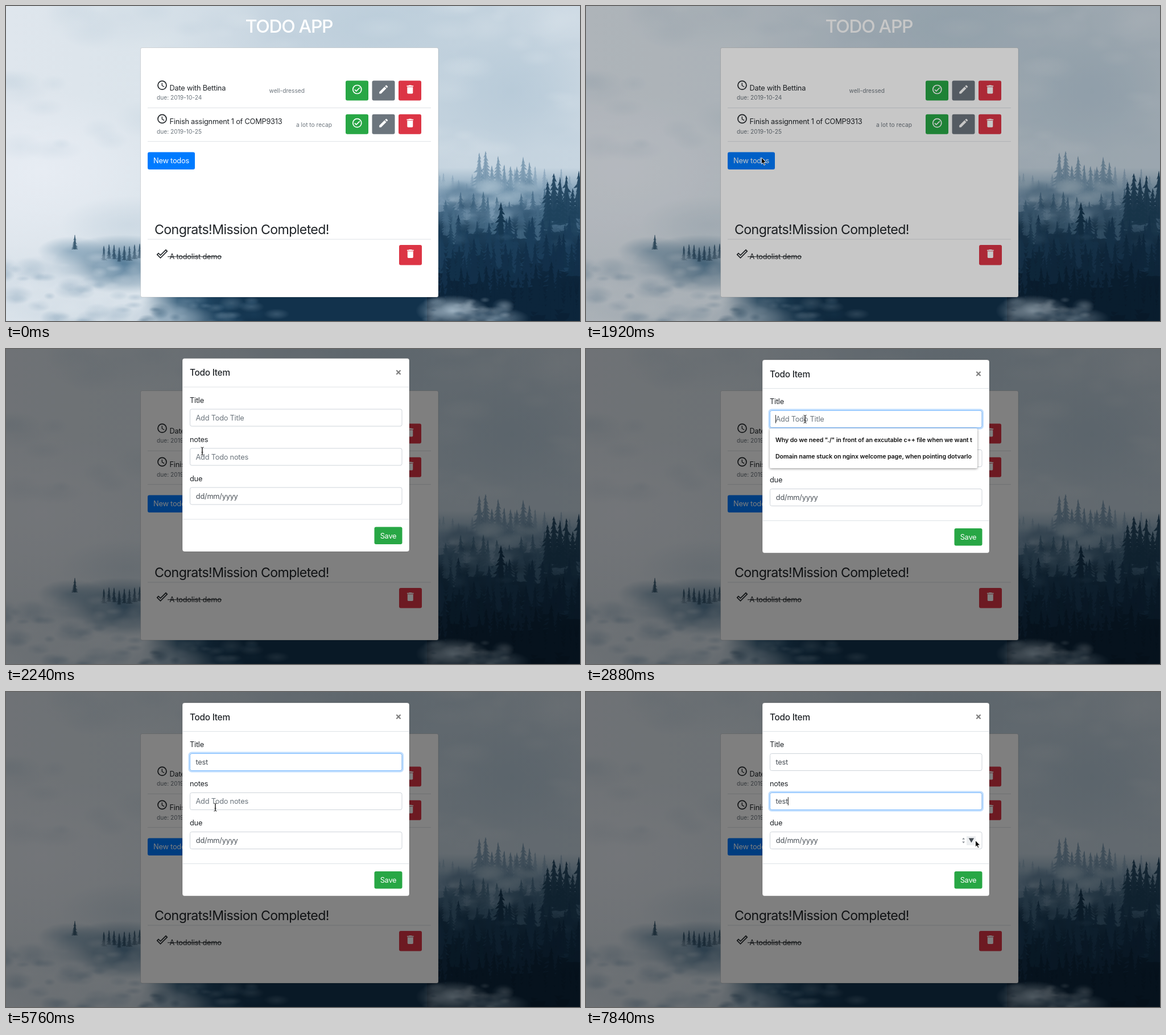
An HTML page with a canvas that plays this animation: 1009 by 555 pixels, repeating every 8 s.

```html
<!DOCTYPE html>
<html lang="en">
<head>
<meta charset="utf-8">
<title>Todo app</title>
<style>
  html, body { margin: 0; width: 100%; height: 100%; overflow: hidden; }
  canvas, svg { position: absolute; left: 0; top: 0; width: 1009px; height: 555px; }
  text { font: 12.8px Inter, "Open Sans", sans-serif; letter-spacing: -.018em; fill: #212529; white-space: pre; }
  .small { font-size: 10.2px; letter-spacing: 0; fill: #6c757d; }
  .white { fill: #fff; }
  .mid { text-anchor: middle; }
  .h1 { font-size: 31.9px; font-weight: 500; letter-spacing: -.04em; }
  .h3 { font-size: 23.2px; letter-spacing: -.027em; }
  .h5 { font-size: 15.4px; font-weight: 500; letter-spacing: -.018em; }
  .hint { fill: #6c757d; }
  .value { fill: #495057; }
  .pick { font-size: 10.66px; font-weight: 600; letter-spacing: -.009em; fill: #111; }
  .rule { stroke: #dee2e6; fill: none; }
  .field { fill: #fff; stroke: #ced4da; }
  #list { filter: drop-shadow(0 1px 2px rgba(0, 0, 0, .45)); }
</style>
</head>
<body>
<canvas id="photo" width="1009" height="555"></canvas>
<svg viewBox="0 0 1009 555">
  <defs>
    <symbol id="clock" viewBox="0 0 24 24">
      <g fill="none" stroke="#212529"><circle cx="12" cy="12" r="9" stroke-width="2"/><path d="M11.8 7v5.6l4.6 2.7" stroke-width="1.6"/></g>
    </symbol>
    <symbol id="ok" viewBox="0 0 24 24">
      <g fill="none" stroke="#fff" stroke-width="2"><circle cx="12" cy="12" r="9"/><path d="M6.7 12.3l3.4 3.3 7.2-7.2"/></g>
    </symbol>
    <symbol id="pen" viewBox="0 0 24 24">
      <path fill="#fff" d="M3 17.25V21h3.75L17.81 9.94l-3.75-3.75zM20.71 7.04a1 1 0 0 0 0-1.41l-2.34-2.34a1 1 0 0 0-1.41 0l-1.83 1.83 3.75 3.75z"/>
    </symbol>
    <symbol id="bin" viewBox="0 0 24 24">
      <path fill="#fff" d="M6 19c0 1.1.9 2 2 2h8c1.1 0 2-.9 2-2V7H6zM19 4h-3.5l-1-1h-5l-1 1H5v2h14z"/>
    </symbol>
    <symbol id="done" viewBox="0 0 24 24">
      <path fill="#212529" d="M19.77 5.03l1.4 1.4L8.43 19.17l-5.6-5.6 1.4-1.4 4.2 4.2zm0-2.83L8.43 13.54l-4.2-4.2L0 13.57 8.43 22 24 6.43z" fill-rule="evenodd"/>
    </symbol>
    <clipPath id="cut"><rect x="323" y="140" width="356" height="71"/></clipPath>
  </defs>

  <text class="h1 white mid" x="497.5" y="46.5">TODO APP</text>
  <rect x="236.5" y="73.5" width="523.5" height="439.5" rx="3" fill="#fff" stroke="rgba(0,0,0,.125)"/>

  <g id="acts">
    <use href="#clock" x="264.5" y="129.7" width="20" height="20"/>
    <rect x="597" y="131.5" width="40" height="35" rx="3" fill="#28a745"/>
    <rect x="643.5" y="131.5" width="40" height="35" rx="3" fill="#6c757d"/>
    <rect x="690" y="131.5" width="40" height="35" rx="3" fill="#dc3545"/>
    <use href="#ok" x="607.3" y="137" width="20" height="20"/>
    <use href="#pen" x="653.7" y="137" width="20" height="20"/>
    <use href="#bin" x="700.3" y="137" width="20" height="20"/>
    <path class="rule" d="M249 179.5H747"/>
  </g>
  <use href="#acts" y="59.2"/>
  <text x="287.5" y="149">Date with Bettina</text>
  <text class="small" x="265" y="165.3">due: 2019-10-24</text>
  <text class="small" x="462.5" y="153.3">well-dressed</text>
  <text x="287.5" y="208.4">Finish assignment 1 of COMP9313</text>
  <text class="small" x="265" y="224.6">due: 2019-10-25</text>
  <text class="small" x="510" y="212.6">a lot to recap</text>

  <rect id="add" x="249" y="257.5" width="83" height="30.5" rx="3"/>
  <text class="white mid" x="290.5" y="277.4">New todos</text>

  <text class="h3" x="261" y="402">Congrats!Mission Completed!</text>
  <path class="rule" d="M249 411H747"/>
  <use href="#done" x="264.5" y="426.7" width="20" height="20"/>
  <text x="287.5" y="445.8">A todolist demo</text>
  <path d="M284 441.7H379" stroke="#212529"/>
  <rect x="691" y="421" width="40" height="35.5" rx="3" fill="#dc3545"/>
  <use href="#bin" x="700.8" y="426.5" width="20" height="20"/>

  <rect id="dim" width="1009" height="555"/>

  <g id="modal">
    <rect x="310" y="19" width="399" height="340.5" rx="4" fill="#fff" stroke="rgba(0,0,0,.2)"/>
    <path class="rule" d="M310 69.5H709M310 302.5H709"/>
    <text class="h5" x="323" y="49.7">Todo Item</text>
    <path d="M686.3 40l7.2 7.2m0-7.2l-7.2 7.2" stroke="#7f7f7f" stroke-width="2.2"/>
    <text x="323" y="97">Title</text>
    <text x="323" y="166">notes</text>
    <text x="323" y="235">due</text>
    <rect class="field" x="323.5" y="108.5" width="372.5" height="30" rx="3"/>
    <rect class="field" x="323.5" y="177.5" width="372.5" height="30" rx="3"/>
    <rect class="field" x="323.5" y="246.5" width="372.5" height="30" rx="3"/>
    <g id="focus" fill="none">
      <rect x="321.7" y="-1.8" width="376" height="33.6" rx="4.5" stroke="#007bff" stroke-opacity=".25" stroke-width="2.5"/>
      <rect x="323.5" width="372.5" height="30" rx="3" stroke="#80bdff"/>
    </g>
    <text id="title" x="333.5" y="128.4"></text>
    <text id="notes" x="333.5" y="197.4"></text>
    <text class="value" x="333.8" y="266.4">dd/mm/yyyy</text>
    <rect id="caret" width="1" height="14.5" fill="#222"/>
    <g id="spin">
      <rect x="669" y="254" width="16" height="16" fill="#eceef0"/>
      <path d="M672.7 257.5h9.4l-4.7 8z" fill="#444b52"/>
      <path d="M661.2 259.7l2.4-3 2.4 3zm0 3.8l2.4 3 2.4-3z" fill="#8a9096"/>
    </g>
    <rect x="647.5" y="316" width="49" height="30.5" rx="3" fill="#28a745"/>
    <text class="white mid" x="672" y="336">Save</text>
    <g id="list">
      <rect x="323" y="140" width="365" height="70" rx="2" fill="#fff"/>
      <g clip-path="url(#cut)">
        <text class="pick" x="333" y="164.3">Why do we need "./" in front of an excutable c++ file when we want to run</text>
        <text class="pick" x="333" y="193.3">Domain name stuck on nginx welcome page, when pointing dotvarlo</text>
      </g>
    </g>
  </g>

  <path id="arrow" d="M0 0v11.6l2.6-2.4 1.8 4.2 1.9-.8-1.8-4.1h3.7z" stroke="#fff" stroke-width=".9"/>
  <g id="beam" fill="none">
    <path d="M-2.5-7Q0-7 0-5V5Q0 7-2.5 7M2.5-7Q0-7 0-5V5Q0 7 2.5 7M-1.5 2h3" stroke="#fff" stroke-width="2" stroke-opacity=".6"/>
    <path d="M-2.5-7Q0-7 0-5V5Q0 7-2.5 7M2.5-7Q0-7 0-5V5Q0 7 2.5 7M-1.5 2h3" stroke="#222"/>
  </g>
</svg>

<script>
const $ = id => document.getElementById(id);

// Misty forest backdrop
const g = $('photo').getContext('2d');
let seed = 11;
const rnd = () => (seed = (seed * 16807) % 2147483647) / 2147483647;
const between = (a, b) => a + (b - a) * rnd();

function puff(x, y, rx, ry, color, alpha) {
  g.save();
  g.translate(x, y);
  g.scale(rx, ry);
  const r = g.createRadialGradient(0, 0, 0, 0, 0, 1);
  r.addColorStop(0, color + 'ff');
  r.addColorStop(.5, color + '90');
  r.addColorStop(1, color + '00');
  g.globalAlpha = alpha;
  g.fillStyle = r;
  g.fillRect(-1, -1, 2, 2);
  g.restore();
}

function wisps(count, x0, x1, y0, y1, size, colors, alpha) {
  for (let i = 0; i < count; i++) {
    const r = size * between(.4, 1.3);
    puff(between(x0, x1), between(y0, y1), r, r * between(.35, .7), colors[i % colors.length], alpha);
  }
}

function blend(x0, y0, x1, y1, colors) {
  const l = g.createLinearGradient(x0, y0, x1, y1);
  colors.forEach((c, i) => l.addColorStop(i / (colors.length - 1), c));
  g.fillStyle = l;
}

function tree(x, y, h, color, alpha = 1) {
  const w = h * .2, n = 11;
  g.globalAlpha = alpha;
  g.fillStyle = color;
  for (const s of [1, -1]) {
    g.beginPath();
    g.moveTo(x - s * .4, y);
    for (let i = 1; i <= n; i++) {
      const q = i / n;
      g.lineTo(x + s * w * q ** .8 * between(.5, 1.3), y + h * q);
      g.lineTo(x + s * w * q * .45, y + h * (q - .02));
    }
    g.lineTo(x - s * .4, y + h);
    g.fill();
  }
  g.globalAlpha = 1;
}

function row(count, x0, x1, top, jitter, h, color, alpha) {
  for (let i = 0; i < count; i++) {
    const x = x0 + (x1 - x0) * (i + rnd()) / count;
    tree(x, top - (x - x0) / (x1 - x0) * 14 + between(-jitter, jitter), h * between(.75, 1.2), color, alpha);
  }
}

function paint() {
  blend(0, 0, 1009, 0, ['#dfe6ed', '#dbe4eb', '#c3d2de', '#c1d1dd', '#c7d5e0']);
  g.fillRect(0, 0, 1009, 555);
  puff(60, 290, 240, 140, '#e8edf4', .9);
  puff(210, 20, 150, 60, '#cbd8e2', .5);
  puff(640, 35, 130, 60, '#b9ccd9', .6);
  puff(890, 150, 130, 110, '#b3c7d6', .7);
  puff(990, 20, 110, 60, '#d3dee7', .8);
  puff(800, 270, 110, 60, '#cbd8e2', .8);
  puff(215, 385, 120, 50, '#c3d2de', .6);
  wisps(110, 0, 1009, 0, 260, 42, ['#dde6ec', '#b9cbd9'], .22);

  // left hillside, mostly lost in fog
  puff(205, 455, 125, 52, '#47718f', .95);
  puff(115, 432, 60, 26, '#7f9fb6', .7);
  puff(60, 470, 80, 30, '#9db5c7', .6);
  tree(121, 403, 26, '#35566e', .9);
  for (let i = 0; i < 8; i++) tree(172 + i * 9, 420 + between(-6, 6), 26, '#2c4c65', .8);

  // dark foot of the page
  blend(236, 0, 430, 0, ['#2f587600', '#335b78', '#1b3f5b', '#12324c']);
  g.fillRect(236, 500, 524, 55);

  // right hillside
  blend(0, 285, 0, 510, ['#8fabc000', '#86a4ba', '#446884', '#1f425d', '#133049', '#0d263c', '#0a2035']);
  g.fillRect(740, 285, 269, 270);
  row(20, 750, 1012, 304, 14, 60, '#7f9db4', .55);
  for (let i = 0; i < 9; i++) tree(832 + i * 11, between(252, 284), 65, '#6c8ea7', .7);
  wisps(26, 755, 930, 312, 352, 30, ['#a9bfce', '#9cb5c6', '#5d7f99'], .5);
  row(22, 750, 1012, 346, 16, 60, '#456a85', .75);
  for (let i = 0; i < 6; i++) tree(952 + i * 11, between(287, 322), 85, '#1f425d', .9);
  wisps(16, 790, 960, 345, 375, 26, ['#7f9db4', '#2a4d69'], .35);
  tree(870, 346, 80, '#163750');
  row(18, 750, 1012, 384, 18, 70, '#1b3e5a', .9);
  wisps(16, 760, 1009, 385, 430, 24, ['#3d617c', '#143149'], .35);
  row(22, 750, 1012, 428, 18, 75, '#12304a', .95);
  row(24, 750, 1012, 478, 18, 80, '#0c253b', 1);

  // low fog
  puff(20, 500, 170, 80, '#d8e1e9', .9);
  puff(130, 545, 220, 62, '#d5dfe7', .95);
  puff(290, 552, 90, 30, '#aabdcc', .7);
  puff(785, 537, 65, 28, '#a8bccb', .9);
  puff(860, 550, 60, 20, '#8aa3b6', .7);
  wisps(110, -10, 240, 440, 560, 24, ['#dfe7ee', '#cfdae4', '#7c9bb3'], .3);
  wisps(40, 240, 480, 518, 560, 18, ['#8aa5b9', '#234b69'], .3);
  wisps(30, 740, 890, 515, 560, 16, ['#c2d0db', '#b0c2d0', '#1b3c57'], .28);
}
paint();

// Interaction, advancing in ticks of 160 ms
const TICK = 160, LOOP = 8000;
const track = [
  [1, 961, 258], [2, 720, 290], [3, 440, 338], [4, 276, 357], [5, 276, 357],
  [6, 284, 335], [7, 300, 295], [8, 309, 272], [11, 308.5, 267], [12, 308.5, 267],
  [13, 318, 222], [14, 345, 180], [15, 368, 148], [16, 380, 130], [17, 385, 123.5],
  [32, 385, 123.5], [33, 382, 142], [36, 368, 203], [38, 367, 193], [44, 367, 193],
  [45, 450, 205], [46, 590, 270], [47, 704, 300], [48, 698, 275], [49, 684.5, 261.5]
];

function pointer(k) {
  const i = Math.max(1, track.findIndex(p => p[0] >= k));
  const [a, x, y] = track[i - 1], [b, u, v] = track[i];
  const q = Math.max(0, (k - a) / (b - a));
  return [x + (u - x) * q, y + (v - y) * q];
}

const show = (id, on) => $(id).style.display = on ? '' : 'none';
const set = (id, name, value) => $(id).setAttribute(name, value);
const within = (v, a, b) => v >= a && v <= b;
const typed = (k, keys) => 'test'.slice(0, keys.filter(s => k >= s).length);

function fill(id, value, hint) {
  $(id).textContent = value || hint;
  set(id, 'class', value ? 'value' : 'hint');
}

function draw(k) {
  const [x, y] = pointer(k);
  set('add', 'fill', within(k, 8, 11) ? '#0069d9' : '#007bff');
  set('dim', 'opacity', k < 12 ? 0 : k < 13 ? .22 : .5);

  show('modal', k >= 13);
  set('modal', 'opacity', k < 14 ? .5 : 1);
  set('modal', 'transform', `translate(0 ${k < 14 ? -23.5 : k < 15 ? -2.5 : 0})`);

  const title = typed(k, [25, 26, 28, 29]), notes = typed(k, [40, 41, 42, 43]);
  fill('title', title, 'Add Todo Title');
  fill('notes', notes, 'Add Todo notes');

  const second = k >= 38, top = second ? 177.5 : 108.5;
  show('focus', k >= 17);
  set('focus', 'transform', `translate(0 ${top})`);
  show('list', within(k, 18, 19));

  show('caret', within(k, 17, 30) || within(k, 38, 44) || k >= 48);
  const text = second ? notes : title;
  set('caret', 'x', 333 + (text ? $(second ? 'notes' : 'title').getComputedTextLength() + .3 : 0));
  set('caret', 'y', top + 7.7);

  show('spin', k >= 45 && within(x, 323, 696) && within(y, 247, 277));
  const visible = k >= 1 && !within(k, 23, 32) && !within(k, 40, 44);
  const beam = k >= 14 && within(x, 323, 696) && (within(y, 108, 139) || within(y, 177, 208));
  show('arrow', visible && !beam);
  show('beam', visible && beam);
  set('arrow', 'transform', `translate(${x} ${y})`);
  set('beam', 'transform', `translate(${x} ${y})`);
}

const start = performance.now();
let last = -1;
function frame() {
  const k = Math.floor((performance.now() - start) % LOOP / TICK);
  if (k !== last) draw(last = k);
  requestAnimationFrame(frame);
}
frame();
</script>
</body>
</html>
```
